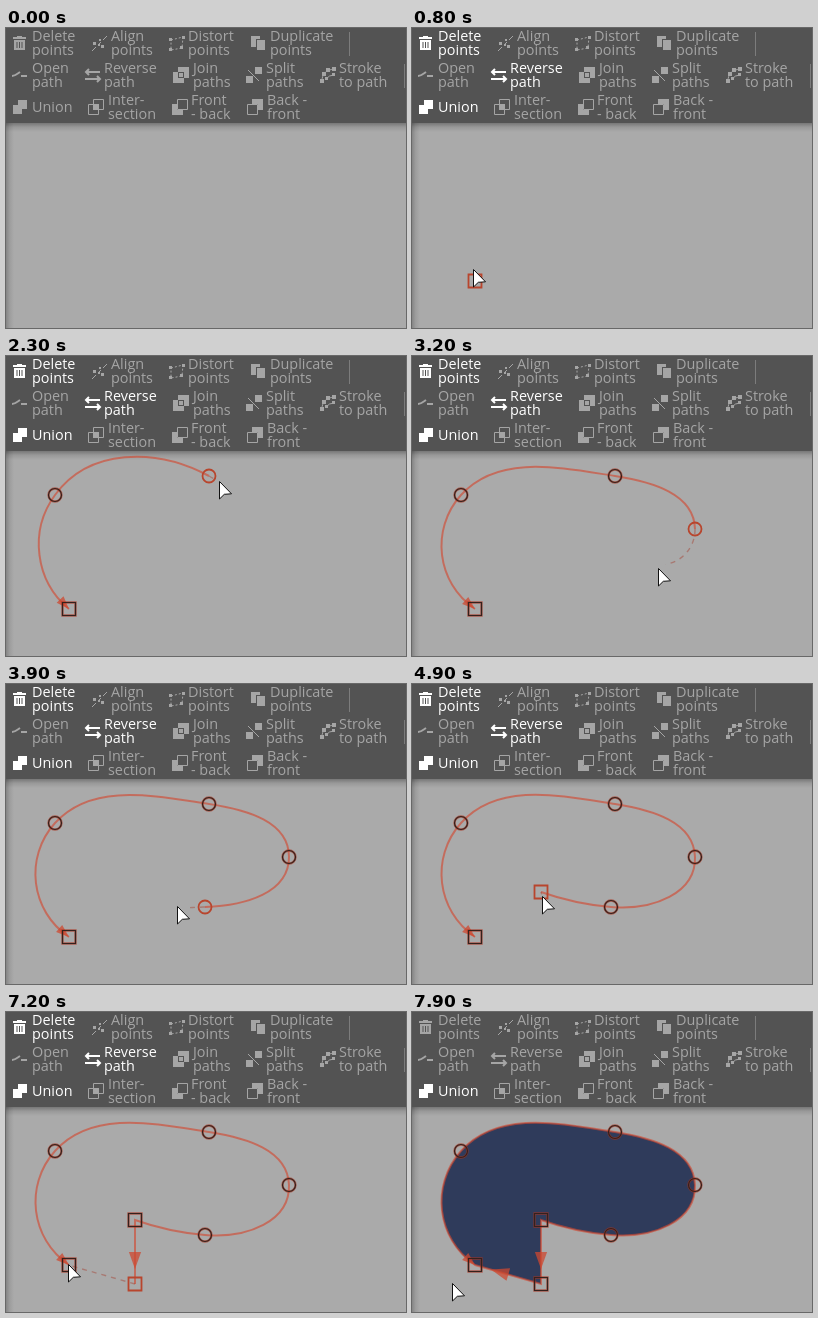
An HTML page with a canvas that plays this animation: 400 px wide and 300 px high, repeating every 8 s.

```html
<!DOCTYPE html>
<html lang="en">
<head>
<meta charset="utf-8">
<title>Drawing a path</title>
<style>
  html, body { margin: 0; width: 100%; height: 100%; overflow: hidden; background: #aaa; }
  canvas { display: block; width: 400px; height: 300px; }
</style>
</head>
<body>
<canvas id="stage" width="400" height="300"></canvas>
<script>
const ctx = document.getElementById('stage').getContext('2d');
const LOOP = 8000, STEP = 100, BAR = 95;
const RED = '#b8452d', LINE = 'rgba(212,72,48,.62)', DARK = '#35211c';

// Steps at which the drawing changes state.
const FIRST_CLICK = 8, CURVE_DONE = 46, GUIDES_ON = 58, CORNER = 66, CLOSED = 73;

const nodes = [
  { x: 63, y: 253, at: FIRST_CLICK, square: true },
  { x: 49, y: 139, at: 13 },
  { x: 203, y: 120, at: 23 },
  { x: 283, y: 173, at: 29 },
  { x: 199, y: 223, at: 38 },
  { x: 129, y: 208, at: CURVE_DONE, square: true },
  { x: 129, y: 272, at: CORNER, square: true }
];

// Pointer moves: first step, last step, start, bend, end.
const moves = [
  [2, 6, [62, 302], [62, 277], [62, 252]],
  [8, 12, [62, 252], [58, 215], [48, 138]],
  [13, 16, [48, 138], [110, 95], [222, 113]],
  [17, 17, [222, 113], [224, 113], [226, 114]],
  [19, 20, [226, 114], [214, 115], [202, 119]],
  [23, 27, [202, 119], [244, 142], [282, 172]],
  [29, 36, [282, 172], [251.5, 227], [198, 222]],
  [38, 42, [198, 222], [160, 226], [131, 209]],
  [44, 44, [131, 209], [130, 208], [128, 207]],
  [49, 55, [128, 208], [139, 230], [131, 257]],
  [58, 63, [131, 257], [129, 264], [128, 271]],
  [66, 72, [128, 271], [98, 266], [62, 252]],
  [75, 79, [62, 252], [43, 284], [40, 271]]
];

const tools = [
  { x: 7, y: 8, tx: 26, base: 13, text: ['Delete', 'points'], on: [FIRST_CLICK, CLOSED],
    fill: 'M4 0h5v1h4v2H0V1h4zM1 4h11v10H1zM3.5 6v6h1V6zM6 6v6h1V6zM8.5 6v6h1V6z' },
  { x: 86, y: 8, tx: 105, base: 13, text: ['Align', 'points'],
    stroke: 'M0 15L4 11M6 9L9 6M11 4L15 0', fill: 'M1 6h3v3H1zM6 8h2v2H6zM9 9h3v3H9zM7 3h2v2H7z' },
  { x: 163, y: 8, tx: 182, base: 13, text: ['Distort', 'points'], dash: [2, 2],
    stroke: 'M2 4L14 1L13 12L2 14Z', fill: 'M0 2h3v3H0zM13 0h3v3h-3zM11 10h3v3h-3zM0 12h3v3H0z' },
  { x: 245, y: 8, tx: 264, base: 13, text: ['Duplicate', 'points'],
    fill: 'M0 0h9v3H5v8H0zM6 4h8v10H6z' },
  { x: 6, y: 43, tx: 26, base: 45, text: ['Open', 'path'], weight: 2,
    stroke: 'M0 5C3 5 5 3 8 1M9 5H15' },
  { x: 79, y: 41, tx: 98, base: 45, text: ['Reverse', 'path'], on: [FIRST_CLICK, CLOSED], weight: 2,
    stroke: 'M1 3H15M4 0L1 3L4 6M0 10H15M12 7L15 10L12 13' },
  { x: 167, y: 39, tx: 187, base: 45, text: ['Join', 'paths'],
    fill: 'M5 0h11v11h-5v5H0V5h5zM5 5h6v6H5zM6 6h4v4H6z' },
  { x: 240, y: 39, tx: 260, base: 45, text: ['Split', 'paths'],
    stroke: 'M2 3L13 14', fill: 'M0 9h7v7H0zM9 0h7v7H9z' },
  { x: 314, y: 39, tx: 333, base: 45, text: ['Stroke', 'to path'],
    stroke: 'M2 14C2 7 6 3 14 2M6 12Q9 8 14 8', fill: 'M0 12h4v4H0zM2 5h4v4H2zM6 1h4v4H6zM12 0h4v4h-4zM12 6h3v3h-3zM5 10h3v3H5z' },
  { x: 7, y: 72, tx: 26, base: 84, text: ['Union'], on: [FIRST_CLICK, 80],
    fill: 'M5 0h9v9H9v5H0V5h5z' },
  { x: 82, y: 71, tx: 102, base: 77, text: ['Inter-', 'section'],
    stroke: 'M5.5 .5h10v10h-10zM.5 5.5h10v10h-10z', fill: 'M5 5h6v6H5z' },
  { x: 166, y: 71, tx: 185, base: 77, text: ['Front', '- back'],
    stroke: 'M5.5 .5h10v10h-10z', fill: 'M0 5h5v6h6v5H0z' },
  { x: 241, y: 71, tx: 261, base: 77, text: ['Back -', 'front'],
    stroke: 'M.5 5.5h10v10H.5z', fill: 'M5 0h11v11h-5V5H5z' }
];
for (const tool of tools) {
  for (const key of ['fill', 'stroke']) if (tool[key]) tool[key] = new Path2D(tool[key]);
}

function pointerAt(step) {
  const move = moves.filter(m => step > m[0] - 1).pop();
  if (!move) return null;
  const [first, last, a, b, c] = move;
  const t = Math.min(1, (step - first + 1) / (last - first + 1));
  const u = 0.3 * t + 0.7 * t * t * (3 - 2 * t), v = 1 - u;
  const mix = i => v * v * a[i] + 2 * u * v * b[i] + u * u * c[i];
  return { x: mix(0), y: mix(1) };
}

// Smooth spline through the points (Hobby's method, natural ends).
function spline(pts) {
  const n = pts.length - 1, len = [], ang = [], turn = Array(n + 1).fill(0), theta = Array(n + 1).fill(0);
  for (let k = 0; k < n; k++) {
    const dx = pts[k + 1].x - pts[k].x, dy = pts[k + 1].y - pts[k].y;
    len[k] = Math.hypot(dx, dy);
    ang[k] = Math.atan2(dy, dx);
    if (k) turn[k] = Math.atan2(Math.sin(ang[k] - ang[k - 1]), Math.cos(ang[k] - ang[k - 1]));
  }
  for (let pass = 0; n > 1 && pass < 60; pass++) {
    theta[0] = -turn[1] - theta[1];
    for (let k = 1; k < n; k++) {
      const p = 1 / len[k - 1], q = 1 / len[k];
      theta[k] = (-2 * p * turn[k] - q * turn[k + 1] - p * theta[k - 1] - q * theta[k + 1]) / (2 * p + 2 * q);
    }
    theta[n] = -theta[n - 1];
  }
  const { sin, cos, sqrt } = Math;
  const reach = (a, b) =>
    (2 + sqrt(2) * (sin(a) - sin(b) / 16) * (sin(b) - sin(a) / 16) * (cos(a) - cos(b))) /
    (3 * (1 + (sqrt(5) - 1) / 2 * cos(a) + (3 - sqrt(5)) / 2 * cos(b)));
  return len.map((d, k) => {
    const a = theta[k], b = -turn[k + 1] - theta[k + 1], p = pts[k], q = pts[k + 1];
    const r = d * reach(a, b), s = d * reach(b, a);
    return {
      p, q, start: ang[k] + a,
      c: [p.x + r * cos(ang[k] + a), p.y + r * sin(ang[k] + a),
          q.x - s * cos(ang[k] - b), q.y - s * sin(ang[k] - b), q.x, q.y]
    };
  });
}

function stroke(color, width, dash = []) {
  ctx.strokeStyle = color;
  ctx.lineWidth = width;
  ctx.setLineDash(dash);
  ctx.stroke();
  ctx.setLineDash([]);
}

function line(x1, y1, x2, y2, color, width, dash) {
  ctx.beginPath();
  ctx.moveTo(x1, y1);
  ctx.lineTo(x2, y2);
  stroke(color, width, dash);
}

function trace(segments) {
  ctx.beginPath();
  if (!segments.length) return;
  ctx.moveTo(segments[0].p.x, segments[0].p.y);
  for (const s of segments) ctx.bezierCurveTo(...s.c);
}

function arrow(x, y, angle, length) {
  ctx.save();
  ctx.translate(x, y);
  ctx.rotate(angle);
  ctx.beginPath();
  ctx.moveTo(0, 0);
  ctx.lineTo(-length, -length * 0.36);
  ctx.lineTo(-length, length * 0.36);
  ctx.fillStyle = 'rgba(205,72,48,.75)';
  ctx.fill();
  ctx.restore();
}

function marker({ x, y, square }, active) {
  ctx.beginPath();
  if (square) ctx.rect(x - 6.5, y - 6.5, 13, 13);
  else ctx.arc(x, y, 6.5, 0, Math.PI * 2);
  stroke(active ? RED : 'rgba(170,50,30,.65)', active ? 1.8 : 2.3);
  if (!active) stroke(DARK, 1.2);
}

function drawGuides(tip) {
  const { x, y } = nodes[5], slope = Math.tan(Math.PI / 3), blue = '#3c587c';
  line(0, y + 0.5, 400, y + 0.5, blue, 1);
  line(x - (y - BAR) / slope, BAR, x + (300 - y) / slope, 300, blue, 1);
  line(x, BAR, x, 300, '#5d929e', 1.1);
  line(x, y, x, tip.y, '#5a6d72', 1, [5, 4]);
}

function drawPath(step) {
  const placed = nodes.filter(n => n.at <= step);
  if (!placed.length) return;
  const tip = pointerAt(step - 0.5);
  tip.x++;
  tip.y++;
  const closed = step >= CLOSED, last = placed[placed.length - 1];
  const away = Math.hypot(tip.x - last.x, tip.y - last.y) > 1.5;
  const drawing = step < CURVE_DONE;
  const knots = drawing && away ? [...placed, tip] : placed.slice(0, 6);
  const segments = spline(knots);
  const solid = drawing && away ? segments.slice(0, -1) : segments;

  if (step >= GUIDES_ON && step < CORNER) drawGuides(tip);

  trace(solid);
  if (step >= CORNER) ctx.lineTo(nodes[6].x, nodes[6].y);
  if (closed) {
    ctx.closePath();
    ctx.fillStyle = '#2f3b5b';
    ctx.fill();
  }
  stroke(LINE, 2);

  if (drawing && away) {
    trace(segments.slice(-1));
    stroke('rgba(165,75,60,.5)', 1.4, [5, 5]);
  } else if (!drawing && !closed && step >= 49) {
    line(last.x, last.y, tip.x, tip.y, 'rgba(165,75,60,.5)', 1.4, [5, 5]);
  }

  if (solid.length) arrow(nodes[0].x, nodes[0].y, solid[0].start + Math.PI + 0.12, 13);
  if (step >= CORNER) arrow(129, 257, Math.PI / 2, 17);
  if (closed) arrow(79, 257.6, Math.atan2(-19, -66), 18);

  placed.forEach(n => marker(n, n === last && !closed));
}

function shade(x, y, w, h, dx, dy, alpha) {
  const g = ctx.createLinearGradient(x, y, x + dx, y + dy);
  g.addColorStop(0, `rgba(0,0,0,${alpha})`);
  g.addColorStop(0.45, `rgba(0,0,0,${alpha * 0.35})`);
  g.addColorStop(1, 'rgba(0,0,0,0)');
  ctx.fillStyle = g;
  ctx.fillRect(x, y, w, h);
}

function drawToolbar(step) {
  ctx.fillStyle = '#535353';
  ctx.fillRect(0, 0, 400, BAR);
  ctx.font = '14.4px "Open Sans", sans-serif';
  for (const tool of tools) {
    const active = tool.on && step >= tool.on[0] && step < tool.on[1];
    const color = active ? '#fff' : '#a5a5a5';
    ctx.fillStyle = ctx.strokeStyle = color;
    tool.text.forEach((word, i) => ctx.fillText(word, tool.tx, tool.base + 14 * i));
    ctx.save();
    ctx.translate(tool.x, tool.y);
    if (tool.fill) ctx.fill(tool.fill, 'evenodd');
    if (tool.stroke) {
      ctx.lineWidth = tool.weight || 1;
      ctx.setLineDash(tool.dash || []);
      ctx.stroke(tool.stroke);
    }
    ctx.restore();
  }
  line(343.5, 4, 343.5, 28, '#7c7c7c', 1);
  line(398.5, 36, 398.5, 60, '#7c7c7c', 1);
}

function drawPointer(step) {
  const tip = pointerAt(step);
  if (!tip) return;
  ctx.save();
  ctx.translate(Math.round(tip.x) + 0.5, Math.round(tip.y) + 0.5);
  ctx.beginPath();
  ctx.moveTo(0, 0);
  ctx.lineTo(0, 17.5);
  ctx.lineTo(4.8, 12.8);
  ctx.lineTo(12, 12.3);
  ctx.closePath();
  ctx.fillStyle = '#fff';
  ctx.fill();
  stroke('#111', 1);
  ctx.restore();
}

function draw(step) {
  ctx.fillStyle = '#aaa';
  ctx.fillRect(0, 0, 400, 300);
  shade(0, BAR, 400, 9, 0, 9, 0.3);
  shade(0, BAR, 8, 205, 8, 0, 0.22);
  drawPath(step);
  drawToolbar(step);
  drawPointer(step);
}

const began = performance.now();
function tick() {
  draw(Math.floor((performance.now() - began) % LOOP / STEP));
  requestAnimationFrame(tick);
}
tick();
</script>
</body>
</html>
```
